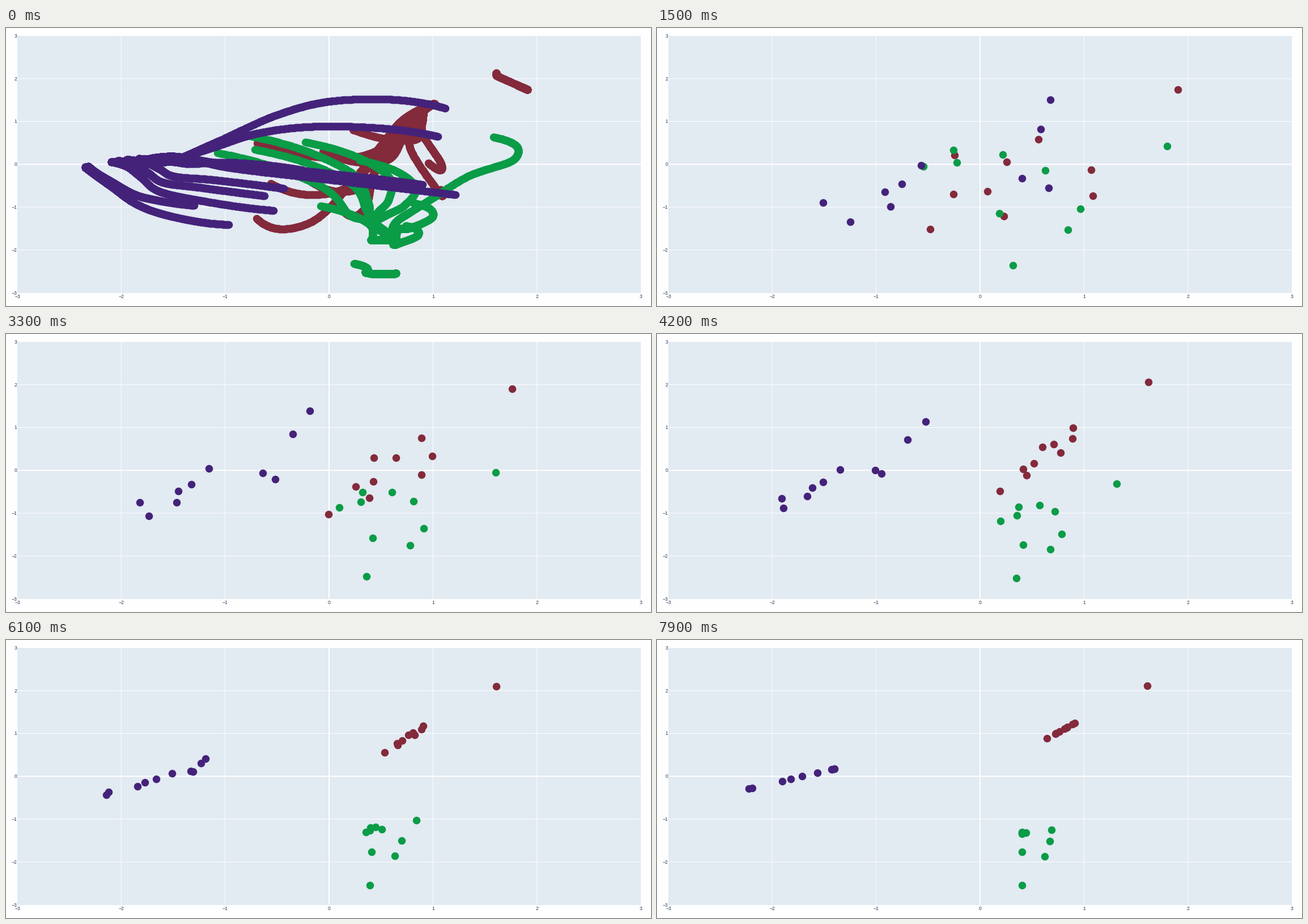
These frames come from a looping animation (1138 by 492 pixels, 8 s). A matplotlib script:

```python
import matplotlib.pyplot as plt
import numpy as np
from matplotlib.animation import FuncAnimation
from matplotlib.patches import Rectangle

W, H, DPI = 1138, 492, 100
PX = 72 / DPI                      # points per pixel
STEP, FRAMES, TRAIL_FRAMES = 100, 80, 5
LEFT, RIGHT, TOP, BOTTOM = 20, 1120, 14, 468.5
RED, GREEN, PURPLE = "#832a3b", "#0a9c46", "#44227a"

# Moments (ms) of the stages of every path; the last lies beyond the loop.
TIMES = np.array([500, 1500, 2500, 4200, 5400, 6900, 7900, 16000])


def mix(a, b, f):
    return a + (b - a) * f


class Group:
    """Dots that share one flow: start, bend sideways, gather, settle, rest."""

    def __init__(self, color, starts, bend, gather, settle, rest):
        a = np.array(starts, float).T

        def apply(rule, p):
            return np.stack(np.broadcast_arrays(*rule(*p), p[0])[:2])

        b, g = apply(bend, a), apply(gather, a)
        s = apply(settle, g)
        self.color = color
        self.keys = np.stack([
            a, mix(a, g, 0.22) + 0.8 * b, mix(a, g, 0.53) + b,
            g, mix(g, s, 0.56), mix(g, s, 0.9), s, apply(rest, s)])
        self.slopes = np.gradient(self.keys, TIMES, axis=0, edge_order=2)
        self.slopes[-1] = 0

    def at(self, t):
        """Positions (x row, y row) at time t, by cubic Hermite."""
        k = min(np.searchsorted(TIMES, t, side="right"), len(TIMES) - 1) - 1
        h = TIMES[k + 1] - TIMES[k]
        u = (t - TIMES[k]) / h
        p, m = self.keys, self.slopes * h
        return ((1 + 2 * u) * (1 - u) ** 2 * p[k] + u * (1 - u) ** 2 * m[k]
                + u * u * (3 - 2 * u) * p[k + 1] + u * u * (u - 1) * m[k + 1])

    def trail(self):
        return np.hstack([self.at(t) for t in range(TIMES[0], TIMES[-1] + 1, 20)])


def red_settle(x, y):
    sx = 722 + 0.2 * (x - y - 495)
    return sx, 168 - 0.55 * (sx - 699)


def green_settle(x, y):
    side = np.tanh((x + 0.4 * (y - 340) - 703) / 12)
    return 670 + 26 * side, np.maximum(310 + 0.1 * y, y + 2)


def purple_settle(x, y):
    q = np.minimum(x - 0.5 * (y - 280), 450)
    sx = 313 - 0.0026 * (450 - q) ** 2
    return sx, 228 + 0.235 * (313 - sx)


groups = [
    Group(RED, [(901, 101)],
          bend=lambda x, y: (32, 14),
          gather=lambda x, y: (x - 34, y - 16),
          settle=lambda x, y: (x - 2, y - 4.5),
          rest=lambda x, y: (x, y)),
    Group(RED, [(612, 180), (443, 204), (559, 219), (745, 239), (767, 286),
                (538, 272), (467, 275), (590, 318), (442, 337)],
          bend=lambda x, y: (0.24 * (360 - y), 0.09 * (y + 100)),
          gather=lambda x, y: (688 + 0.24 * x - 0.56 * y, 134 - 0.12 * x + 0.586 * y),
          settle=red_settle,
          rest=lambda x, y: (mix(758, x, 0.1), mix(132, y, 0.1))),
    Group(GREEN, [(860, 193), (425, 190), (373, 221), (439, 215), (528, 202),
                  (624, 234), (719, 310), (705, 350), (555, 315), (614, 417)],
          bend=lambda x, y: (0.23 * (470 - y), 0),
          gather=lambda x, y: (534.5 + 0.4 * x - 0.35 * y, 227 - 0.1 * x + 0.64 * y),
          settle=green_settle,
          rest=lambda x, y: (688, np.maximum(y, 374))),
    Group(PURPLE, [(775, 142), (762, 192), (793, 295), (735, 277), (525, 252),
                   (490, 284), (456, 297), (472, 323), (332, 314), (393, 348)],
          bend=lambda x, y: (-18, 0.13 * (y - 310)),
          gather=lambda x, y: (273 + 0.36 * x - 0.55 * y, 123 - 0.07 * x + 0.61 * y),
          settle=purple_settle,
          rest=lambda x, y: (136 + 0.78 * (x - 157), 231 + 0.013 * (y - 229) ** 2)),
]

fig = plt.figure(figsize=(W / DPI, H / DPI), dpi=DPI, facecolor="#fefefe")
ax = fig.add_axes([0, 0, 1, 1])
ax.set(xlim=(0, W), ylim=(H, 0))
ax.axis("off")
ax.add_patch(Rectangle((LEFT, TOP), RIGHT - LEFT, BOTTOM - TOP, fc="#e2eaf2", lw=0))

font = dict(family="Liberation Sans", size=8.6 * PX, color="#2a3f5f")
for v in range(-3, 4):
    x = LEFT + (v + 3) * (RIGHT - LEFT) / 6
    y = BOTTOM - (v + 3) * (BOTTOM - TOP) / 6
    if abs(v) < 3:
        grid = dict(color="white", lw=(1 if v else 2) * PX,
                    solid_capstyle="butt", snap=False)
        ax.plot([x, x], [TOP, BOTTOM], **grid)
        ax.plot([LEFT, RIGHT], [y, y], **grid)
    label = str(v).replace("-", "\u2212")
    ax.text(x, 478, label, ha="center", va="baseline", **font)
    ax.text(19.3, y + 3, label, ha="right", va="baseline", **font)

dots = [ax.plot([], [], "o", color=g.color, ms=13.5 * PX, mew=0)[0] for g in groups]
trails = [g.trail() for g in groups]


def draw(i):
    for group, trail, line in zip(groups, trails, dots):
        line.set_data(*(trail if i < TRAIL_FRAMES else group.at(i * STEP)))
    return dots


anim = FuncAnimation(fig, draw, frames=FRAMES, interval=STEP, repeat=True, repeat_delay=0)
plt.show()
```
